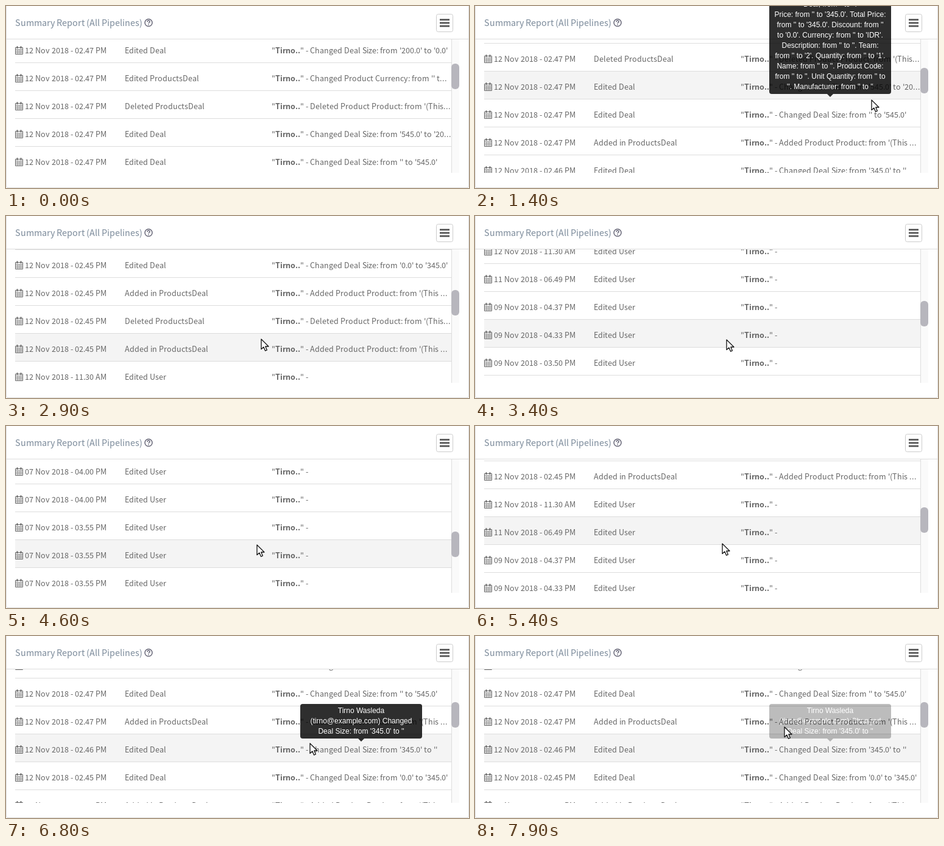
These frames come from a looping animation (760 by 300 pixels, 8 s). An HTML page:

```html
<!DOCTYPE html>
<html lang="en">
<head>
<meta charset="utf-8">
<title>Summary Report</title>
<style>
  html, body { margin: 0; width: 100%; height: 100%; overflow: hidden; background: #fff; }
  svg { display: block; width: 760px; height: 300px; }
  text { white-space: pre; fill: #666; }
  .title { fill: #7b8a9a; }
  .tip text { font: 12px "Liberation Sans", Arial, sans-serif; fill: #fff; text-anchor: middle; }
</style>
</head>
<body>
<svg viewBox="0 0 760 300">
  <defs>
    <clipPath id="view"><rect x="0" y="55" width="760" height="220"/></clipPath>
    <g id="calendar" fill="none" stroke="#666">
      <path d="M.5 2.5h12v11H.5z"/>
      <path d="M.5 5.5h12M.5 8.2h12M.5 10.8h12M3.5 5.5v8M6.5 5.5v8M9.5 5.5v8" stroke-width=".7"/>
      <path d="M3.5 .3v3.6M9.5 .3v3.6" stroke-width="1.9"/>
    </g>
  </defs>
  <path d="M.5 0V297q0 2.5 2.5 2.5H757q2.5 0 2.5-2.5V0M0 54.5H760" fill="none" stroke="#ddd"/>
  <text id="title" class="title"></text>
  <g fill="none" stroke="#667" stroke-width="1.5">
    <circle cx="234" cy="27.5" r="6"/>
    <path d="M231.9 26.2q.1-2.2 2.1-2.2t2.1 1.8q0 1-1.1 1.6t-1 1.5M234 29.9v1.7"/>
  </g>
  <rect x="706.5" y="13.5" width="27" height="29" rx="3" fill="#fff" stroke="#ccc"/>
  <path d="M712 22.7h16M712 27.9h16M712 33.1h16" stroke="#555" stroke-width="2.7"/>
  <g clip-path="url(#view)">
    <rect x="731" y="55" width="13" height="220" fill="#fafafa"/>
    <path d="M731.5 55V275" stroke="#ddd"/>
    <g id="list"><rect id="hover" x="15" width="716" height="45" fill="#f4f4f4"/></g>
    <rect id="thumb" x="731" width="13" height="42" rx="6" fill="#b7b6bd"/>
  </g>
  <g id="tips"></g>
  <path id="cursor" d="M0 0V16.6L3.9 13 6.6 19.2 9.4 18 6.8 12H12z" fill="#fff" stroke="#111" stroke-width="1.3" stroke-linejoin="round"/>
</svg>
<script>
const $ = id => document.getElementById(id);
const ROW = 46, FIRST = 73, LINE = 17, LOOP = 8000, STEP = 100;
const FAMILY = '"Noto Sans CJK JP", "Noto Sans CJK SC", "Noto Sans", sans-serif';
const BODY = '12.54px ' + FAMILY, BOLD = 'bold ' + BODY, TITLE = '14.33px ' + FAMILY;
const pen = document.createElement('canvas').getContext('2d');

function add(parent, tag, attrs, text = '') {
  const el = document.createElementNS('http://www.w3.org/2000/svg', tag);
  for (const k in attrs) el.setAttribute(k, attrs[k]);
  el.textContent = text;
  return parent.appendChild(el);
}

// Sets a run with whole-pixel advances and returns where it ends
function run(line, x, y, text, font = BODY) {
  pen.font = font;
  const xs = [...text].map(c => {
    const left = x;
    x += Math.round(pen.measureText(c).width);
    return left;
  });
  add(line, 'tspan', { x: xs.join(' '), y, style: 'font:' + font }, text);
  return x;
}

run($('title'), 15, 33, 'Summary Report (All Pipelines)', TITLE);

// "~" marks a cut-off text
const size = (a, b) => ['Edited Deal', `Changed Deal Size: from '${a}' to '${b}`];
const added = ['Added in ProductsDeal', "Added Product Product: from '(This ~"];
const deleted = ['Deleted ProductsDeal', "Deleted Product Product: from '(This~"];
const user = ['Edited User', ''];
const rows = [
  ['12 Nov 2018 - 02.47 PM',
    size('200.0', "0.0'"),
    ['Edited ProductsDeal', "Changed Product Currency: from '' t~"],
    deleted, size('545.0', '20~'), size('', "545.0'"), added],
  ['12 Nov 2018 - 02.46 PM', size('345.0', "'")],
  ['12 Nov 2018 - 02.45 PM', size('0.0', "345.0'"), added, deleted, added],
  ['12 Nov 2018 - 11.30 AM', user],
  ['11 Nov 2018 - 06.49 PM', user],
  ['09 Nov 2018 - 04.37 PM', user],
  ['09 Nov 2018 - 04.33 PM', user],
  ['09 Nov 2018 - 03.50 PM', user, user],
  ['08 Nov 2018 - 05.12 PM', user],
  ['07 Nov 2018 - 04.00 PM', user, user, user, user],
  ['07 Nov 2018 - 03.55 PM', user, user, user, user, user]
].flatMap(([date, ...items]) => items.map(item => [date, ...item]));

rows.forEach(([date, action, detail], i) => {
  const y = FIRST + i * ROW, base = y + 5;
  add($('list'), 'use', { href: '#calendar', x: 15, y: y - 7 });
  const line = add($('list'), 'text', {});
  run(line, 31, base, date);
  run(line, 195, base, action);
  let x = run(line, 436, base, '"');
  x = run(line, x, base, 'Tirno..', BOLD);
  x = run(line, x, base, '" - ' + detail.replace('~', ''));
  if (detail.endsWith('~')) for (let n = 0; n < 3; n++) run(line, x + n * 4, base, '.');
  add($('list'), 'path', { d: `M15 ${y + 20.5}H731`, stroke: '#ddd' });
});

function makeTip(bottom, lines) {
  const g = add($('tips'), 'g', { class: 'tip' });
  const height = lines.length * LINE + 6, y = bottom - height;
  add(g, 'rect', { x: 483, y, width: 200, height, rx: 4, 'fill-opacity': .82 });
  add(g, 'path', { d: `M578 ${bottom}h10l-5 5z`, 'fill-opacity': .82 });
  lines.forEach((s, i) => add(g, 'text', { x: 583, y: y + 15 + i * LINE }, s));
  return g;
}
const productTip = makeTip(145, [
  "Deal, from '' to ''.",
  "Price: from '' to '345.0'. Total Price:",
  "from '' to '345.0'. Discount: from ''",
  "to '0.0'. Currency: from '' to 'IDR'.",
  "Description: from '' to ''. Team:",
  "from '' to '2'. Quantity: from '' to '1'.",
  "Name: from '' to ''. Product Code:",
  "from '' to ''. Unit Quantity: from '' to",
  "''. Manufacturer: from '' to ''"
]);
const dealTip = makeTip(169, [
  'Tirno Wasleda', '(tirno@example.com) Changed', "Deal Size: from '345.0' to ''"
]);

// Key points: [time, scroll] and [time, x, y]
const scroll = [[1000, 0], [1400, 78], [2200, 255], [2400, 272], [2800, 272], [3400, 521],
  [3800, 614], [4200, 614], [4600, 918], [4800, 950], [5700, 200], [6000, 179], [6600, 162]];
const pointer = [[200, 735, -5], [700, 650, 151], [1400, 651, 153.9], [2200, 427, 200],
  [3400, 413, 203], [4600, 412, 195], [6000, 401, 191.4], [6600, 470, 176], [6800, 499, 176],
  [7600, 499, 176], [7900, 508, 149]];

const clamp = v => Math.max(0, Math.min(1, v));
const fade = (t, from, to) => Math.min(clamp((t - from) / 200), clamp(1 - (t - to) / 440));

function at(track, t, col = 1) {
  const n = track.findIndex(k => k[0] > t);
  if (n === 0) return track[0][col];
  if (n < 0) return track[track.length - 1][col];
  const a = track[n - 1], b = track[n];
  return a[col] + (b[col] - a[col]) * (t - a[0]) / (b[0] - a[0]);
}

function draw(now) {
  const t = Math.floor(now % LOOP / STEP) * STEP;
  const s = Math.round(at(scroll, t));
  $('list').setAttribute('transform', `translate(0 ${-s})`);
  $('thumb').setAttribute('y', Math.round(95 + s * .0862));
  // The highlight stays behind when the pointer leaves its last row
  const hoverY = at(pointer, Math.min(t, 7600), 2);
  const row = Math.floor((hoverY - 48 + s) / ROW);
  $('hover').setAttribute('y', FIRST + row * ROW - 25);
  $('hover').setAttribute('visibility', t < 1100 ? 'hidden' : 'visible');
  const x = Math.round(at(pointer, t)), y = Math.round(at(pointer, t, 2)) + 1;
  $('cursor').setAttribute('transform', `translate(${x} ${y})`);
  $('cursor').setAttribute('visibility', t < 200 ? 'hidden' : 'visible');
  productTip.setAttribute('opacity', fade(t, 500, 1400));
  dealTip.setAttribute('opacity', fade(t, 6600, 7600));
}

function tick() {
  draw(performance.now());
  requestAnimationFrame(tick);
}
tick();
</script>
</body>
</html>
```
